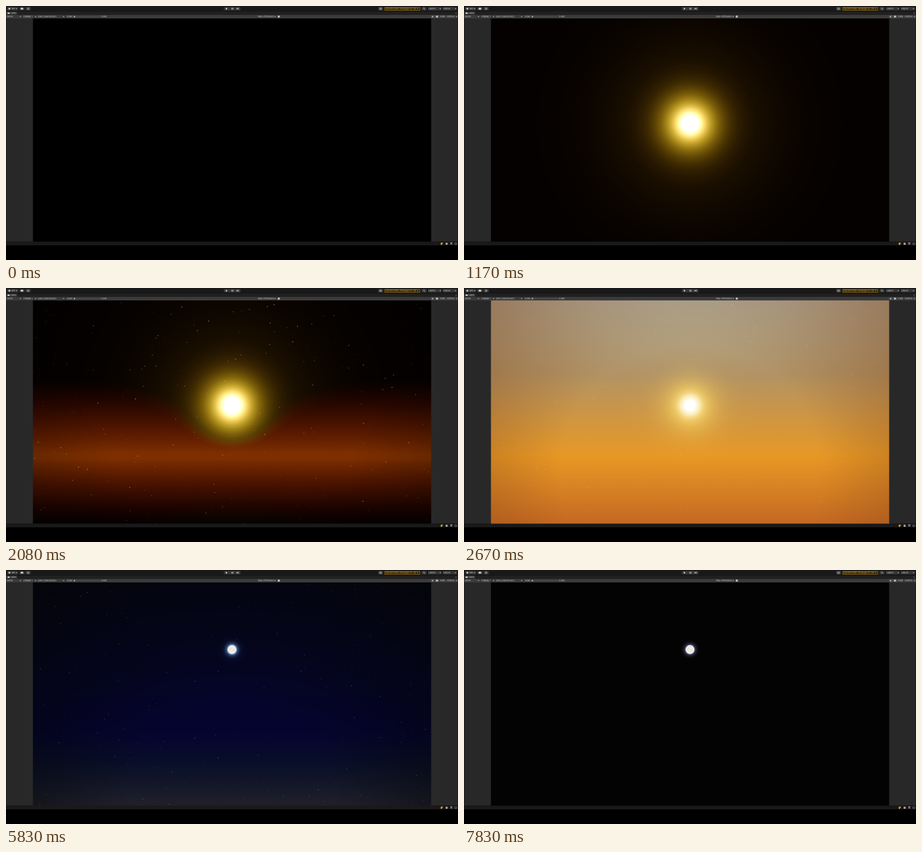
An HTML page with a canvas for the animation above (8 s loop, 800 px wide and 450 px high).

```html
<!DOCTYPE html>
<html lang="en">
<head>
<meta charset="utf-8">
<title>Sky layers</title>
<style>
  html, body { margin: 0; width: 100%; height: 100%; overflow: hidden; background: #000; }
  canvas, svg { position: absolute; left: 0; top: 0; width: 800px; height: 450px; }
  text { font: 3.8px Inter, "Liberation Sans", sans-serif; fill: #c4c4c4; }
</style>
</head>
<body>
<canvas id="view" width="800" height="450"></canvas>
<svg viewBox="0 0 800 450">
  <defs>
    <path id="arrow" d="M-1.3-.8h2.6L0 1z" fill="#c4c4c4"/>
  </defs>
  <!-- panels -->
  <path d="M0 0H800V9.5H0z" fill="#191919"/>
  <path d="M0 9.5H800V15.5H0z" fill="#202020"/>
  <path d="M0 9.8H20V15.5H0z" fill="#303030"/>
  <path d="M0 15.5H800V22H0z" fill="#3b3b3b"/>
  <path d="M0 22H47.7V417.4H0zM752.5 22H800V417.4H752.5z" fill="#282828"/>
  <path d="M0 22H.8V417H0zM799.3 22H800V417H799.3z" fill="#191919"/>
  <path d="M0 417.4H800V424H0z" fill="#191919"/>
  <!-- top bar -->
  <g fill="#363636">
    <rect x="2" y="1.8" width="19.5" height="6" rx="1"/>
    <rect x="23.5" y="1.8" width="9.5" height="6" rx="1"/>
    <rect x="34.5" y="1.8" width="9.5" height="6" rx="1"/>
    <rect x="385.5" y="1.8" width="29.5" height="6" rx="1"/>
    <rect x="658.5" y="1.8" width="9" height="6" rx="1"/>
    <rect x="735.5" y="1.8" width="9" height="6" rx="1"/>
    <rect x="747" y="1.8" width="24" height="6" rx="1"/>
    <rect x="773" y="1.8" width="25" height="6" rx="1"/>
  </g>
  <circle cx="6" cy="4.8" r="1.8" fill="#c4c4c4"/>
  <text x="10" y="6.2">MK</text><use href="#arrow" x="18.6" y="4.8"/>
  <path d="M26.3 6.3a1.2 1.2 0 0 1 .3-2.3 1.7 1.7 0 0 1 3.2 0 1.2 1.2 0 0 1 .3 2.3z" fill="#d0d0d0"/>
  <circle cx="39.2" cy="4.8" r="1.5" fill="none" stroke="#c4c4c4" stroke-width=".9"/>
  <path d="M389 2.8v4l3.2-2zM399.2 3h1v3.6h-1zM401.2 3h1v3.6h-1zM408.3 3v3.6l2.6-1.8zM411 3h.8v3.6h-.8z" fill="#d0d0d0"/>
  <path d="M661.2 3.2h3.6v3.2h-3.6zM661.2 4.8h3.6M663 3.2v3.2" fill="none" stroke="#b0b0b0" stroke-width=".6"/>
  <rect x="670.5" y="2.5" width="62" height="5" fill="#191919" stroke="#a87b10" stroke-width=".9"/>
  <text x="672" y="6.2" style="fill:#f0ad16">Experimental Packages In Use</text>
  <path d="M727.4 4h2.8l-1.4 1.8z" fill="#f0ad16"/>
  <circle cx="739.7" cy="4.4" r="1.3" fill="none" stroke="#c4c4c4" stroke-width=".6"/>
  <path d="M740.6 5.3l1.4 1.4" stroke="#c4c4c4" stroke-width=".7"/>
  <text x="748" y="6.2">Layers</text><use href="#arrow" x="768.6" y="4.8"/>
  <text x="774" y="6.2">Layout</text><use href="#arrow" x="795.6" y="4.8"/>
  <!-- tab and view settings -->
  <rect x="2.5" y="11.5" width="4.3" height="2.5" rx="1.2" fill="#d0d0d0"/>
  <text x="8" y="14.2">Game</text>
  <path d="M796 11h.7v.8h-.7zM796 12.4h.7v.8h-.7zM796 13.8h.7v.8h-.7z" fill="#c4c4c4"/>
  <path d="M28.8 16V22M49 16V22M104.6 16V22" stroke="#2a2a2a" stroke-width=".5"/>
  <text x="1.5" y="20.2">Game</text><use href="#arrow" x="25.7" y="18.7"/>
  <text x="31" y="20.2">Display 1</text><use href="#arrow" x="52.3" y="18.7"/>
  <text x="56.5" y="20.2">QHD (2560x1440)</text><use href="#arrow" x="102" y="18.7"/>
  <text x="107.5" y="20.2">Scale</text>
  <path d="M120 18.7h46" stroke="#626262" stroke-width=".6"/>
  <circle cx="121" cy="18.7" r="1.5" fill="#a5a5a5"/>
  <text x="168" y="20.2">0.88x</text>
  <text x="445.7" y="20.2">Play Unfocused</text><use href="#arrow" x="476.3" y="18.7"/>
  <path d="M481 20.6v-2.8l1.8-1.3 1.8 1.3v2.8z" fill="#c4c4c4"/>
  <path d="M752 16h6.8v5.5H752zM759.5 16h7v5.5h-7z" fill="#4a4a4a"/>
  <path d="M753.6 18.2h1l1.4-1v3.2l-1.4-1h-1zM761 17.2h3.6v3H761z" fill="#c4c4c4"/>
  <text x="768" y="20.2">Stats</text>
  <text x="780" y="20.2">Gizmos</text><use href="#arrow" x="797.2" y="18.7"/>
  <!-- status bar -->
  <path d="M769.5 419.3h3.6v2h-1.2v2h-2.4z" fill="#d9a520"/>
  <path d="M778.2 419.4h3.4v3.6h-3.4z" fill="#aaa"/>
  <path d="M786.4 419.4l3.6 3.6M790 419.4l-3.6 3.6M786.4 419.4h3.6" stroke="#c4c4c4" stroke-width=".8"/>
  <circle cx="796" cy="421.2" r="1.8" fill="none" stroke="#a5a5a5" stroke-width=".6"/>
</svg>
<script>
const ctx = document.getElementById('view').getContext('2d');
const LOOP = 8000, NIGHT = 3920, HORIZON = 298;
const LEFT = 47, TOP = 21, WIDE = 707, HIGH = 398;
const SUN = [400, 208], MOON = [400, 141];

const fall = (r, width, power = 1.5) => Math.exp(-((r / width) ** power));

// Colour rules: a radius or a height in pixels gives [r, g, b, alpha].
const sunCore = r => [345 * fall(r, 42), 330 * fall(r, 39), 460 * fall(r, 20)];
const sunWide = r => [40 * fall(r, 150, 2), 27 * fall(r, 135, 2), 5 * fall(r, 70, 2)];
const sunDay = r => {
  const white = fall(r, 18, 2);
  return [250 + 5 * white, 215 + 50 * white, 100 + 200 * white, Math.min(1, 1.4 * fall(r, 36))];
};
const dusk = y => {
  const p = Math.max(0, 1 - Math.abs(y - HORIZON) / (y < HORIZON ? 143 : 125));
  return [130 * p ** 1.15, 50 * p ** 1.9, 0];
};
const blueBand = y => [0, 0, 28 * Math.max(0, 1 - Math.abs(y - HORIZON) / 110)];
const moonHalo = r => [85, 85, 120].map(c => c * Math.exp((8 - r) / 3));
const moonGlow = r => [10, 45, 50].map(c => c * Math.exp((8 - r) / 5));
const daySky = blend([22, 178, 172, 152], [150, 177, 147, 102], [HORIZON, 232, 152, 36], [417, 196, 104, 35]);
const nightSky = blend([22, 2, 2, 20], [290, 2, 0, 43], [340, 5, 10, 35], [417, 28, 28, 36]);
const edge = (color, from, to, most) =>
  r => [...color, most * Math.max(0, (r - from) / (to - from))];

// Straight mix between key colours, each given as [height, r, g, b].
function blend(...keys) {
  return y => {
    const i = Math.max(1, keys.findIndex(k => k[0] >= y));
    const [y0, ...a] = keys[i - 1], [y1, ...b] = keys[i];
    return a.map((c, j) => c + (b[j] - c) * (y - y0) / (y1 - y0));
  };
}

function paint(gradient, rule, start, end, alpha, mode) {
  const steps = 48;
  for (let i = 0; i <= steps; i++) {
    const [r, g, b, a = 1] = rule(start + (end - start) * i / steps);
    gradient.addColorStop(i / steps, `rgba(${r.toFixed()},${g.toFixed()},${b.toFixed()},${a.toFixed(3)})`);
  }
  ctx.globalAlpha = alpha;
  ctx.globalCompositeOperation = mode;
  ctx.fillStyle = gradient;
  ctx.fillRect(LEFT, TOP, WIDE, HIGH);
}

function glow([x, y], rule, end, alpha, mode = 'lighter') {
  paint(ctx.createRadialGradient(x, y, 0, x, y, end), rule, 0, end, alpha, mode);
}

function band(rule, alpha, mode) {
  paint(ctx.createLinearGradient(0, 22, 0, 417), rule, 22, 417, alpha, mode);
}

function stars(seed, count, color, alpha) {
  const rand = () => (seed = seed * 16807 % 2147483647) / 2147483647;
  ctx.globalCompositeOperation = 'source-over';
  ctx.fillStyle = color;
  for (let i = 0; i < count; i++) {
    const power = rand() ** 2, size = 1 + .5 * power;
    ctx.globalAlpha = alpha * (.3 + .7 * power);
    ctx.fillRect(LEFT + rand() * WIDE, TOP + rand() * HIGH, size, size);
  }
}

function disc(x, y, r, color) {
  ctx.globalAlpha = 1;
  ctx.fillStyle = color;
  ctx.beginPath();
  ctx.arc(x, y, r, 0, 7);
  ctx.fill();
}

// Each layer arrives in two hard steps.
const level = (t, start, gap = 90) => t < start ? 0 : t < start + gap ? .5 : 1;

function drawDay(t) {
  const sky = level(t, 2580), low = level(t, 1580);
  glow(SUN, sunWide, 272, level(t, 1080));
  glow(SUN, sunCore, 120, level(t, 580));
  band(dusk, low, 'lighten');
  glow(SUN, edge([0, 0, 0], 230, 420, .25), 420, low, 'source-over');
  band(daySky, sky, 'source-over');
  glow([400, 330], edge([120, 60, 20], 230, 470, .45), 470, sky, 'source-over');
  stars(77, 220, '#e6d2a8', .6 * level(t, 2000, 80) * (1 - .3 * sky));
  glow(SUN, sunDay, 120, sky, 'source-over');
}

function drawNight(t) {
  if (t < 7420) band(blueBand, 1, 'lighter');
  if (t < 6420) {
    band(nightSky, 1, 'source-over');
    glow([400, 417], edge([0, 0, 0], 180, 530, .75), 530, 1, 'source-over');
  }
  if (t < 6920) stars(4021, 240, '#9fb4c4', .35);
  if (t < 7830) glow(MOON, moonGlow, 29, 1);
  glow(MOON, moonHalo, 18, 1);
  ctx.globalCompositeOperation = 'source-over';
  disc(...MOON, 7.9, '#edebe5');
  disc(397.5, 139, 1.6, '#e3dfcf');
  disc(402.5, 142.5, 1.8, '#e5e1d3');
}

function frame() {
  const t = performance.now() % LOOP;
  ctx.globalAlpha = 1;
  ctx.globalCompositeOperation = 'source-over';
  ctx.fillStyle = '#000';
  ctx.fillRect(0, 0, 800, 450);
  if (t < NIGHT) drawDay(t); else drawNight(t);
  requestAnimationFrame(frame);
}
frame();
</script>
</body>
</html>
```
